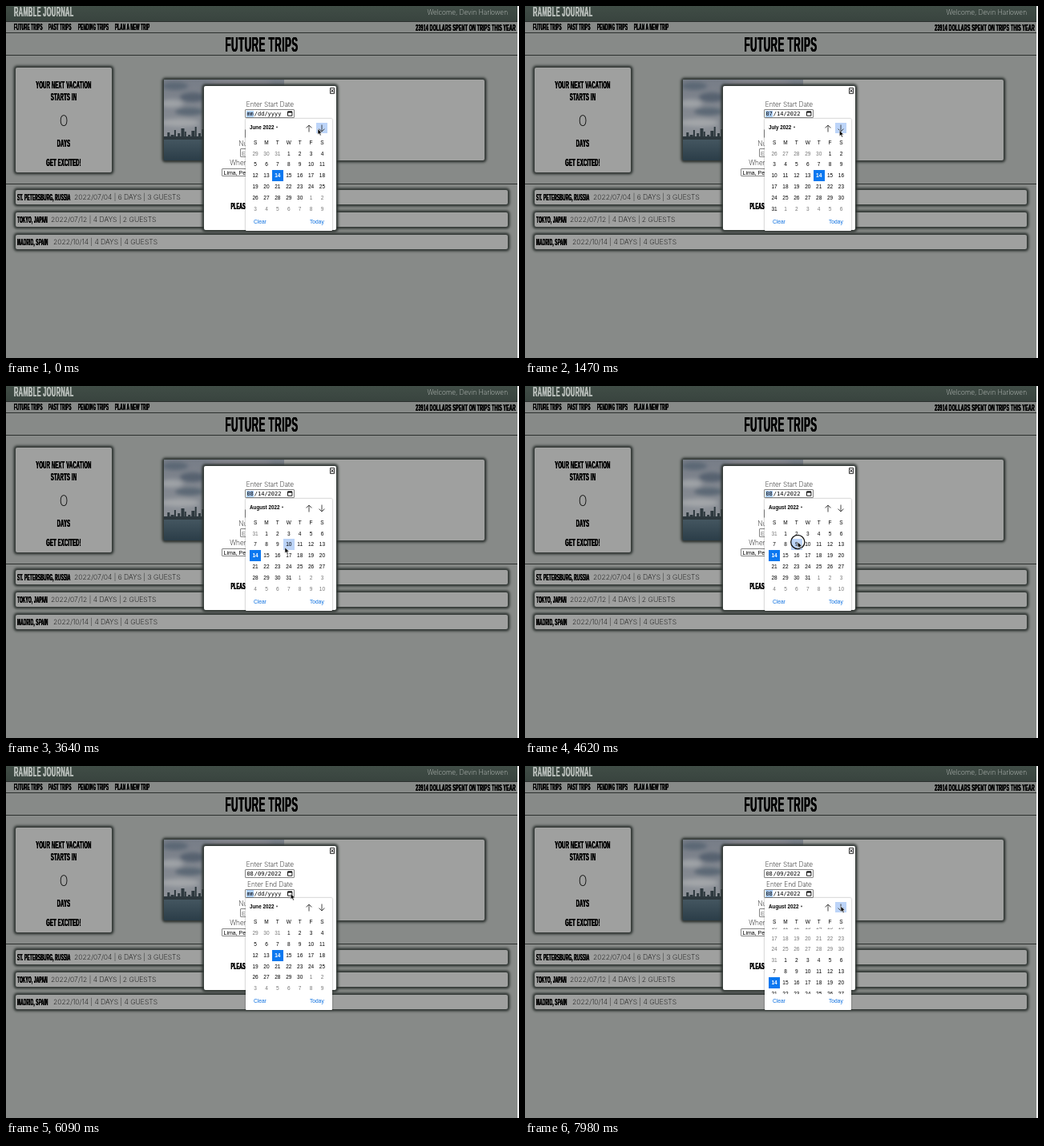
Recreate the animation shown at these times as an HTML page. Size 640 by 440 pixels, loop 8 s.

```html
<!DOCTYPE html>
<html lang="en">
<head>
<meta charset="utf-8">
<title>Trip planner</title>
<style>
html, body { margin: 0; width: 100%; height: 100%; overflow: hidden; }
#stage { position: relative; width: 640px; height: 440px; overflow: hidden; background: #878a88; }
#stage * { position: absolute; box-sizing: border-box; }
svg { overflow: visible; }
svg * { position: static; }
.t { --k: 1; --dx: 0%; white-space: pre; line-height: 1; color: #000;
  transform: translate(var(--dx), -50%) scaleX(var(--k)); transform-origin: 0 50%; }
.mid { --dx: -50%; transform-origin: 50% 50%; }
.end { --dx: -100%; transform-origin: 100% 50%; }
.cond { --k: .45; font-family: "Liberation Sans", Arial, sans-serif; font-weight: 700;
  letter-spacing: .043em; text-shadow: .02em 0, -.02em 0; }
.thin { font-family: Inter, Lato, sans-serif; font-weight: 200; }
.ui { font-family: "Liberation Sans", Arial, sans-serif; }
.mono { font-family: "DejaVu Sans Mono", monospace; }
.box { background: #9fa09f; border-radius: 2px; box-shadow: 0 0 3px 2.5px #2f3532; }
.input { background: #fff; border: 1px solid #858585; border-radius: 1px; }
.pop { left: 298.5px; width: 108.5px; height: 140px; background: #fff; border-radius: 1px;
  box-shadow: 0 0 2px rgba(0, 0, 0, .5); }
.weeks { left: 0; top: 36.5px; width: 108px; height: 83.4px; overflow: hidden; }
.cell { width: 13.9px; height: 13.9px; text-align: center;
  font: 6.5px/13.9px "Liberation Sans", Arial, sans-serif; color: #777; }
.cell.in { color: #000; }
.cell.today { box-shadow: inset 0 0 0 .8px #888; }
.cell.hover { background: #bcd4f8; }
.cell.sel { background: #0b78f0; color: #fff; font-weight: 700; box-shadow: none; }
#label::after { content: ""; display: inline-block; margin: 0 0 1.1px 2.5px;
  border: 1.9px solid transparent; border-top: 2.3px solid #000; border-bottom: 0; }
</style>
</head>
<body>
<div id="stage"></div>
<script>
const stage = document.getElementById('stage');

function add(cls, css, parent = stage) {
  const el = document.createElement('div');
  el.className = cls;
  for (const k in css) el.style[k] = typeof css[k] === 'number' ? css[k] + 'px' : css[k];
  parent.appendChild(el);
  return el;
}
const rect = (x, y, w, h, cls = '', background = '', parent) =>
  add(cls, { left: x, top: y, width: w, height: h, background }, parent);
function text(cls, x, y, size, str, color = '', parent) {
  const el = add('t ' + cls, { left: x, top: y, fontSize: size, color }, parent);
  el.textContent = str;
  return el;
}
function svg(x, y, w, h, body, parent = stage) {
  const el = add('', { left: x, top: y, width: w, height: h }, parent);
  el.innerHTML = `<svg width="${w}" height="${h}" viewBox="0 0 ${w} ${h}">${body}</svg>`;
  return el;
}

// Page behind the dialog
rect(0, 0, 638, 19, '', 'linear-gradient(#404d46, #39443f)');
[19, 33, 61, 222].forEach(y => rect(0, y, 638, 1, '', '#2c302e'));
rect(638, 0, 2, 440, '', '#f2f2f2');
text('cond', 10, 8.3, 16.6, 'RAMBLE JOURNAL', '#b4bab6');
text('thin end', 626, 8, 8.3, 'Welcome, Devin Harlowen', '#c6cbc8');
[[10, 'FUTURE TRIPS'], [53, 'PAST TRIPS'], [90, 'PENDING TRIPS'], [136, 'PLAN A NEW TRIP']]
  .forEach(([x, s]) => text('cond', x, 26.5, 10.2, s));
text('cond end', 636, 26.5, 11.7, '23914 DOLLARS SPENT ON TRIPS THIS YEAR');
text('cond mid', 318.5, 47.5, 26, 'FUTURE TRIPS');

rect(12, 77, 120, 131, 'box');
[[99, 'YOUR NEXT VACATION'], [114, 'STARTS IN'], [172, 'DAYS'], [196, 'GET EXCITED!']]
  .forEach(([y, s]) => text('cond mid', 72, y, 12.9, s));
text('thin mid', 72, 142.5, 18.5, '0');

rect(197, 92, 400, 101, 'box');
const towers = [3, 8, 5, 11, 7, 13, 9, 5, 10, 15, 7, 12]
  .map((h, i) => `<rect x="${i * 4.3}" y="${74 - h}" width="${2 + i % 3}" height="${h}"/>`).join('');
svg(197, 92, 150, 101, `
  <defs>
    <linearGradient id="sky" x2="0" y2="1"><stop stop-color="#777d87"/><stop offset="1" stop-color="#969a9f"/></linearGradient>
    <linearGradient id="sea" x2="0" y2="1"><stop stop-color="#465862"/><stop offset="1" stop-color="#2b3d48"/></linearGradient>
    <filter id="soft"><feGaussianBlur stdDeviation="2.5"/></filter>
    <clipPath id="frame"><rect width="150" height="101"/></clipPath>
  </defs>
  <g clip-path="url(#frame)">
    <rect width="150" height="101" fill="url(#sky)"/>
    <g filter="url(#soft)">
      <ellipse cx="14" cy="8" rx="16" ry="5" fill="#5b6774"/>
      <ellipse cx="95" cy="5" rx="40" ry="6" fill="#85858d"/>
      <ellipse cx="36" cy="22" rx="16" ry="6" fill="#566270"/>
      <ellipse cx="10" cy="30" rx="14" ry="5" fill="#9ea2a6"/>
      <ellipse cx="32" cy="40" rx="18" ry="5" fill="#5c6874"/>
      <ellipse cx="20" cy="54" rx="24" ry="5" fill="#a3a6a9"/>
    </g>
    <rect y="73" width="150" height="28" fill="url(#sea)"/>
    <g fill="#2d383e">${towers}<rect y="71" width="150" height="4"/></g>
  </g>`);

[['ST. PETERSBURG, RUSSIA', 85, '2022/07/04 | 6 DAYS | 3 GUESTS'],
 ['TOKYO, JAPAN', 56, '2022/07/12 | 4 DAYS | 2 GUESTS'],
 ['MADRID, SPAIN', 59, '2022/10/14 | 4 DAYS | 4 GUESTS']].forEach(([place, x, info], i) => {
  const y = 239.3 + i * 27.8;
  rect(12, y - 9, 614, 18, 'box');
  text('cond', 14, y, 10.6, place);
  text('thin', x, y, 8.65, info);
});

// Dialog
rect(247, 100, 165.3, 180, 'box', '#fff');
svg(404, 102, 6, 8, '<path d="M.5.5h5v7h-5zM1.5 2l3 4M4.5 2l-3 4" fill="none" stroke="#222" stroke-width=".9"/>');
[[123, 'Enter Start Date'], [147.5, 'Enter End Date'], [171.5, 'Number of Travelers'],
 [196.3, 'Where do you want to go?']].forEach(([y, s]) => text('thin mid', 329.5, y, 8.4, s));
rect(292, 178, 75, 11, 'input');
text('ui', 294, 183.7, 7, 'Enter number...', '#757575');
rect(269, 203, 121, 10, 'input');
text('ui', 271.5, 208, 7, 'Lima, Peru');
svg(382, 206, 5, 4, '<path d="M.5.8l2 2 2-2" fill="none" stroke="#000"/>');
text('cond mid', 329.5, 251, 11.4, 'PLEASE FILL OUT ALL FORM FIELDS');

function dateField(y) {
  rect(298, y - 5.5, 62, 11, 'input');
  const mark = rect(300, y - 4, 9.3, 8.5, '', '#b0d2fb');
  const [mm, , dd, , yy] = [[300.4, ''], [309.8, '/'], [314, ''], [322.6, '/'], [326.6, '']]
    .map(([x, s]) => text('mono', x, y + .3, 7, s));
  svg(351, y - 3.5, 7, 7, '<path d="M.5 1.2h5.4v5H.5z" fill="none" stroke="#000" stroke-width=".9"/><path d="M.5.6h5.4v1.8H.5z"/>');
  return (value, active) => {
    [mm.textContent, dd.textContent, yy.textContent] = value.split('/');
    mark.style.display = active ? '' : 'none';
  };
}
const startField = dateField(134.7);
const endField = dateField(159.4);

// Calendar: one strip of weeks from May 29, scrolled behind a window
const STEP = 13.9, LEFT = 5.6;
const pop = add('pop', {});
const label = text('ui', 5.5, 11, 6.3, '', '', pop);
label.id = 'label';
label.style.fontWeight = 700;
const nextMark = rect(88.5, 5, 14, 13, '', '#bcd4f8', pop);
const arrow = d => `<path d="${d}" fill="none" stroke="#333" stroke-width=".9"/>`;
svg(75.5, 6.5, 8, 10, arrow('M4 9.5V1M.6 4.4L4 1l3.4 3.4'), pop);
svg(91.5, 6.5, 8, 10, arrow('M4 .5V9M.6 5.6L4 9l3.4-3.4'), pop);
[...'SMTWTFS'].forEach((s, i) => text('ui mid', LEFT + STEP * (i + .5), 29.6, 6.5, s, '', pop));
const strip = rect(0, 0, 108, 16 * STEP, '', '', add('weeks', {}, pop));
const cells = Array.from({ length: 112 }, (_, i) => {
  const date = new Date(Date.UTC(2022, 4, 29 + i));
  const el = rect(LEFT + i % 7 * STEP, Math.floor(i / 7) * STEP, STEP, STEP, 'cell', '', strip);
  el.textContent = date.getUTCDate();
  return { el, month: date.getUTCMonth() - 5, day: date.getUTCDate() };
});
text('ui', 10.5, 128.7, 6.6, 'Clear', '#0b6fe0', pop);
text('ui end', 98.2, 128.7, 6.6, 'Today', '#0b6fe0', pop);

const ring = svg(0, 0, 20, 20, '<circle cx="10" cy="10" r="8.6" fill="none" stroke="#111" stroke-width="1.3"/>');
const cursor = svg(0, 0, 6, 9, '<path d="M0 0v7.2l1.7-1.5 1.2 2.8 1.3-.6L3 5.2h2.3z" stroke="#fff" stroke-width=".6"/>');

// Motion
const LOOP = 8000, SCROLL = 420, PICK = 4760, FOCUS = 5740, OPEN = 5880;
const months = ['June', 'July', 'August'], tops = [0, 4, 9];
const turns = [[840, 1680], [7177, 7770]];
const clicks = [[670, 840], [1510, 1680], [4600, PICK], [FOCUS, OPEN], [7000, 7177], [7595, 7770]];
const path = [[0, 389, 153.5], [70, 389, 153.5], [420, 392.3, 155.5], [2200, 392.3, 155.5], [2590, 357.3, 210],
  [2800, 357.3, 210], [4400, 340.3, 195], [5040, 340.3, 195], [5700, 355.2, 159.6],
  [6300, 355.2, 159.6], [6900, 394, 175.3], [LOOP, 394, 175.3]];

const clamp = v => Math.min(1, Math.max(0, v));
const ease = p => p < .5 ? 2 * p * p : 1 - 2 * (1 - p) ** 2;

function pointer(t) {
  const i = path.findIndex(p => p[0] > t);
  const [t0, x0, y0] = path[i - 1], [t1, x1, y1] = path[i];
  const p = ease((t - t0) / (t1 - t0));
  return [x0 + (x1 - x0) * p, y0 + (y1 - y0) * p];
}

function draw(t) {
  const first = t < FOCUS;
  const [a, b] = turns[first ? 0 : 1];
  const month = (t >= a) + (t >= b);
  const value = month ? `0${6 + month}/14/2022` : 'mm/dd/yyyy';
  startField(first && t < PICK ? value : '08/09/2022', first);
  endField(first ? 'mm/dd/yyyy' : value, !first);

  const [x, y] = pointer(t);
  cursor.style.transform = `translate(${x}px, ${y}px)`;
  ring.style.transform = `translate(${x - 10}px, ${y - 10}px)`;
  ring.style.display = clicks.some(([from, to]) => t >= from && t < to) ? '' : 'none';

  const open = t < PICK || t >= OPEN;
  pop.style.display = open ? '' : 'none';
  if (!open) return;
  const top = first ? 141 : 165.4;
  const scroll = STEP * (tops[1] * ease(clamp((t - a) / SCROLL))
    + (tops[2] - tops[1]) * ease(clamp((t - b) / SCROLL)));
  pop.style.top = top + 'px';
  strip.style.top = -scroll + 'px';
  label.textContent = months[month] + ' 2022';

  const px = x - 298.5, py = y - top;
  nextMark.style.display = px > 88 && px < 103 && py > 5 && py < 18 ? '' : 'none';
  const col = Math.floor((px - LEFT) / STEP), row = Math.floor((py - 36.5 + scroll) / STEP);
  const over = py > 36.5 && py < 120 && col >= 0 && col < 7 ? row * 7 + col : -1;
  cells.forEach((c, i) => {
    const on = c.month === month;
    c.el.className = 'cell' + (on ? ' in' : '') + (c.month === 0 && c.day === 14 ? ' today' : '')
      + (i === over ? ' hover' : '') + (on && c.day === 14 ? ' sel' : '');
  });
}

const begin = performance.now();
function tick() {
  draw((performance.now() - begin) % LOOP);
  requestAnimationFrame(tick);
}
tick();
</script>
</body>
</html>
```
